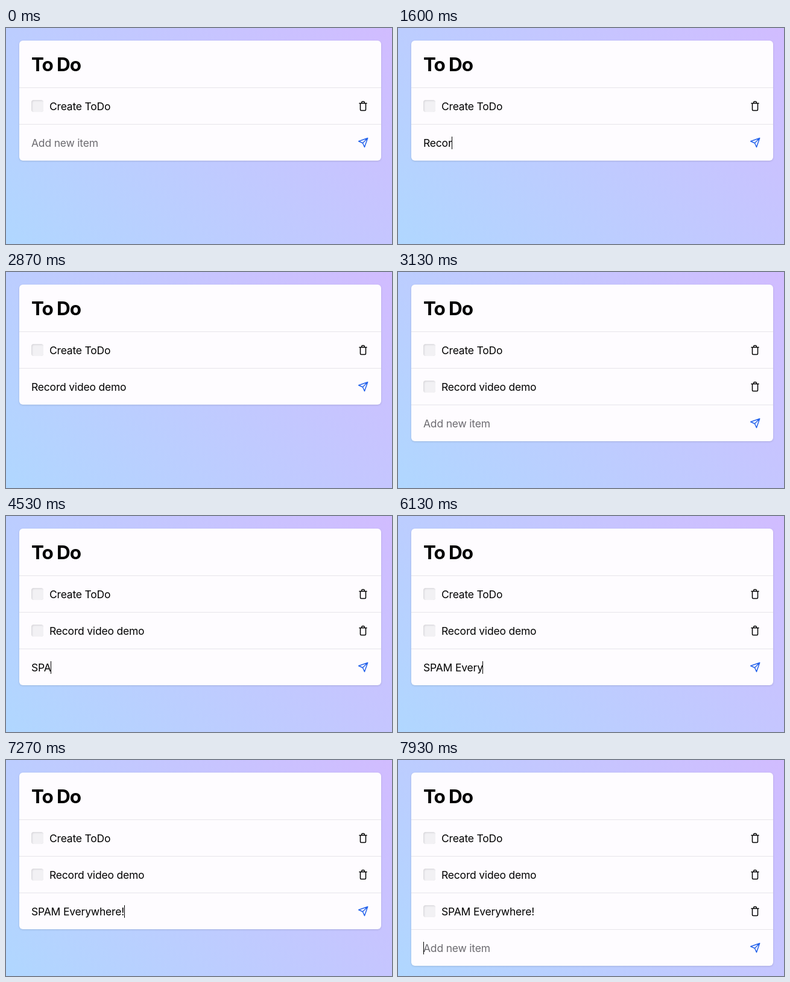
An HTML page for the animation above (8 s loop, 640x360 px).

```html
<!DOCTYPE html>
<html lang="en">
<head>
<meta charset="utf-8">
<title>To Do</title>
<style>
  html, body { margin: 0; width: 100%; height: 100%; overflow: hidden; }
  body { background: linear-gradient(45deg, #b0d7ff, #d1bcff); }
  svg { display: block; width: 640px; height: 360px; }
  text { font: 17.5px Inter, "Noto Sans", sans-serif; letter-spacing: -.2px; white-space: pre; }
  .title { font-size: 31.5px; font-weight: 700; letter-spacing: -1.1px; }
  .icon { fill: none; stroke-width: 2; stroke-linecap: round; stroke-linejoin: round; }
  #card { fill: #fefcff; filter: drop-shadow(0 1px 1.5px rgba(0, 0, 0, .13)); }
  .line { fill: #e6e5ea; }
</style>
</head>
<body>
<svg viewBox="0 0 640 360">
  <defs>
    <filter id="soft"><feGaussianBlur stdDeviation="1.3"/></filter>
    <clipPath id="boxClip"><rect x="42" y="20" width="20" height="20" rx="4"/></clipPath>
    <g id="rowParts">
      <g clip-path="url(#boxClip)">
        <rect x="42" y="20" width="20" height="20" fill="#d9d8dc"/>
        <rect x="43.5" y="21.5" width="22" height="22" rx="4" fill="#f2f1f4" filter="url(#soft)"/>
      </g>
      <path class="icon" stroke="#000" transform="translate(583 21) scale(.75)"
        d="M4 6H20M18 6v14a2 2 0 0 1-2 2H8a2 2 0 0 1-2-2V6m3 0V4a2 2 0 0 1 2-2h2a2 2 0 0 1 2 2v2"/>
      <rect class="line" x="22" y="60" width="600" height="1"/>
    </g>
  </defs>
  <rect id="card" x="22" y="21" width="600" height="200" rx="6"/>
  <text class="title" x="42" y="72">To Do</text>
  <rect class="line" x="22" y="99" width="600" height="1"/>
  <g id="rows"></g>
  <g id="entry">
    <text id="field" x="42" y="37"></text>
    <rect id="caret" y="20" width="1" height="21"/>
    <path class="icon" stroke="#2563eb" transform="translate(583.2 21) scale(.75)"
      d="M22 2L11 13M22 2L15 22L11 13L2 9Z"/>
  </g>
</svg>
<script>
const LOOP = 8000, TOP = 100, ROW = 61, BLINK = 525, SUBMIT = 100;
const $ = id => document.getElementById(id);

// Typed in bursts of evenly spaced keys: [text, first key, last key].
function makeItem(added, ...bursts) {
  return {
    added,
    text: bursts.map(([text]) => text).join(""),
    keys: bursts.flatMap(([text, from, to]) =>
      [...text].map((_, i) => from + (to - from) * i / (text.length - 1)))
  };
}

const items = [
  makeItem(0, ["Create ToDo", 0, 0]),
  makeItem(2930, ["Record", 1120, 1700], [" video demo", 1870, 2800]),
  makeItem(7400, ["SPAM ", 4320, 4720], ["Every", 5270, 5870], ["where!", 6270, 6930])
];

$("rows").innerHTML = items.map((item, i) =>
  `<g transform="translate(0 ${TOP + i * ROW})"><use href="#rowParts"/>` +
  `<text x="72" y="37">${item.text}</text></g>`).join("");

// The caret blinks from the last key, or starts hidden after an item is added.
function caretShown(t, lastAdded, lastKey, next) {
  if (next && t >= next.added - SUBMIT) return false;
  const blinkStart = lastKey ?? lastAdded + BLINK;
  return Math.floor((t - blinkStart) / BLINK) % 2 === 0;
}

function draw(t) {
  const count = items.filter(item => t >= item.added).length;
  [...$("rows").children].forEach((row, i) => row.style.display = i < count ? "" : "none");
  $("card").setAttribute("height", 139 + count * ROW);
  $("entry").setAttribute("transform", `translate(0 ${TOP + count * ROW})`);

  const next = items[count];
  const pressed = next ? next.keys.filter(k => t >= k) : [];
  const typed = pressed.length ? next.text.slice(0, pressed.length) : "";
  const field = $("field");
  field.textContent = typed || "Add new item";
  field.setAttribute("fill", typed ? "#000" : "#6c6b70");

  const width = typed ? field.getComputedTextLength() : 0;
  const shown = caretShown(t, items[count - 1].added, pressed.at(-1), next);
  $("caret").setAttribute("x", Math.floor(42 + width));
  $("caret").style.display = shown ? "" : "none";
}

const start = performance.now();
function tick() {
  draw((performance.now() - start) % LOOP);
  requestAnimationFrame(tick);
}
tick();
</script>
</body>
</html>
```
